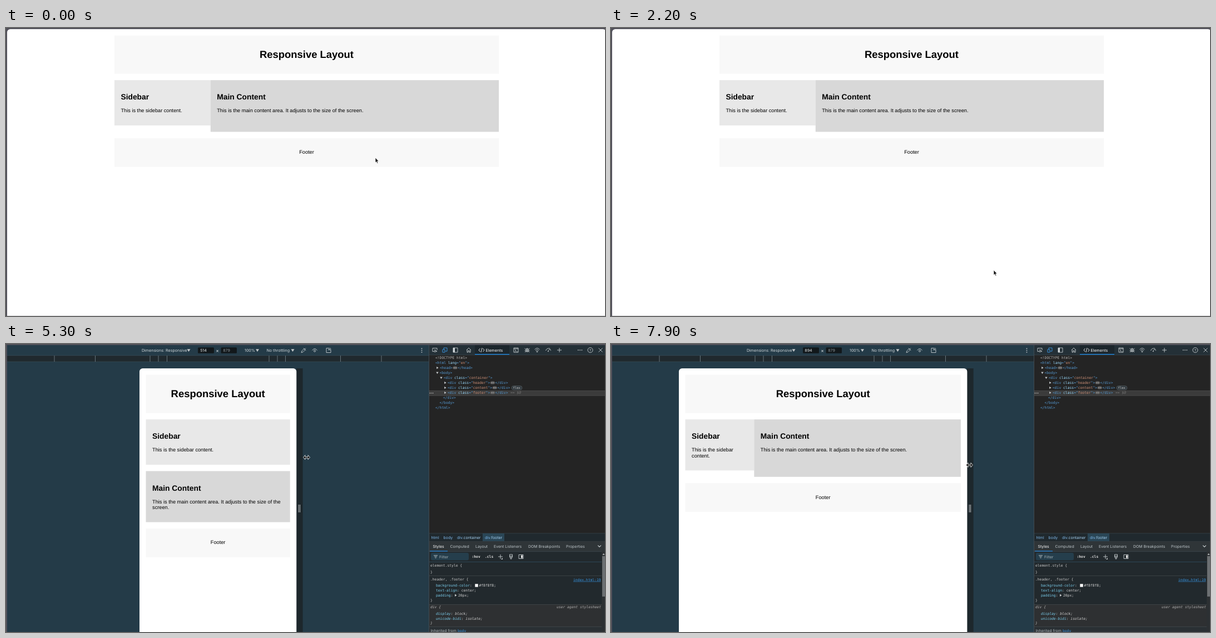
An HTML page for the animation above (8000 ms loop, 1077 by 520 pixels).

```html
<!DOCTYPE html>
<html lang="en">
<head>
<meta charset="utf-8">
<style>
html, body { margin: 0; width: 100%; height: 100%; overflow: hidden; background: #52515a; }
svg { position: absolute; left: 0; top: 0; }
text { white-space: pre; text-rendering: geometricPrecision; }
.ui { font-family: Inter, sans-serif; }
.mono { font-family: "DejaVu Sans Mono", monospace; font-size: 6.336px; }
#page {
  position: absolute; transform-origin: 0 0; transform: scale(.576); overflow: hidden;
  background: #fff; color: #000; font: 16px "Liberation Sans", Arial, sans-serif;
  border-radius: 10px 10px 0 0; text-rendering: geometricPrecision;
}
.container { max-width: 1200px; margin: 0 auto; padding: 20px; }
.container div { box-sizing: border-box; }
.header, .footer { background: #f8f8f8; text-align: center; padding: 20px; }
.header, .content, .sidebar { margin-bottom: 20px; }
.content { display: flex; }
.sidebar { width: 25%; background: #e8e8e8; padding: 20px; }
.main { width: 75%; background: #d8d8d8; padding: 20px; }
.narrow .content { display: block; }
.narrow .sidebar, .narrow .main { width: 100%; }
</style>
</head>
<body>
<svg id="back" width="1077" height="520"></svg>
<div id="page">
  <div class="container">
    <div class="header"><h1>Responsive Layout</h1></div>
    <div class="content">
      <div class="sidebar"><h2>Sidebar</h2><p>This is the sidebar content.</p></div>
      <div class="main"><h2>Main Content</h2><p>This is the main content area. It adjusts to the size of the screen.</p></div>
    </div>
    <div class="footer"><p>Footer</p></div>
  </div>
</div>
<svg id="front" width="1077" height="520"></svg>
<script>
const SCALE = 0.576, CENTER = 381, CHAR = 3.815;
const $ = id => document.getElementById(id);

// Drawing helpers; text is placed by its vertical centre.
const rect = (x, y, w, h, fill, extra = '') =>
  `<rect x="${x}" y="${y}" width="${w}" height="${h}" fill="${fill}" ${extra}/>`;
const ui = (x, y, str, fill = '#d5dbde', size = 6.95, extra = '') =>
  `<text class="ui" x="${x}" y="${y + size * 0.36}" font-size="${size}" fill="${fill}" ${extra}>${str}</text>`;
const mono = (x, y, str, fill = '#c8c8c8', extra = '') =>
  `<text class="mono" x="${x}" y="${y + 2.2}" fill="${fill}" ${extra}>${str}</text>`;
const icon = (x, y, d, color = '#d0d6d9', width = 0.85) =>
  `<path transform="translate(${x} ${y})" d="${d}" fill="none" stroke="${color}" stroke-width="${width}"/>`;
const solid = (x, y, d, color = '#c4c8ca') => `<path transform="translate(${x} ${y})" d="${d}" fill="${color}"/>`;
const span = (color, str) => `<tspan fill="${color}">${str}</tspan>`;
const group = (id, body) => `<g id="${id}">${body}</g>`;
const DOWN = 'M-3-2.2H3L0 2.6Z', RIGHT = 'M-1.5-2.2V2.2L2 0Z', OPEN = 'M-2.2-1.5H2.2L0 2Z';
const DOTS = 'M-4-.7h1.5v1.5h-1.5zM-.7-.7h1.5v1.5h-1.5zM2.6-.7h1.5v1.5h-1.5z';
const MONITOR = 'M-1 2.5H-4V-3.5H4V0M0-1V4L1.4 2.6H4Z';

// Context menu
const MENU = [
  [246.5, 'Back', 'Alt+Left arrow', 'M4 0H-4M-.5-3.5L-4 0L-.5 3.5'],
  [266, 'Refresh', 'Ctrl+R', 'M3.8-1.5A4 4 0 1 0 4 0M4-4V-1.3H1.3'],
  [290, 'Save as', 'Ctrl+S', 'M0 4H-4V-4H2.5L4-2.5V-1M-2-4V-1.5H1.5V-4M-2 4V1H1M0 4L4 0'],
  [309, 'Print', 'Ctrl+P', 'M-2.4 2H-4V-2H4V2H2.4M-2.4-2V-4H2.4V-2M-2.4.5H2.4V4H-2.4Z'],
  [328, 'Translate to English', '', 'M-4-1H-1V3H-3A1 1 0 0 1-3 1H-1M1-4V3H3A1.5 1.5 0 0 0 3-1H1M2-3H4'],
  [352, 'Add page to Collections', '', 'M-2-1.5H4V4H-2ZM1-.5V3M-.8 1.2H2.8M-3 2L-4-2.5L1.5-4L2-2'],
  [376.5, 'Share', '', 'M-1-3H-4V4H3V1.5M-2 1Q-1-2 2-2M1-4L4-1.8L1 .3'],
  [400.5, 'Screenshot', 'Ctrl+Shift+S', 'M-4-1V-3.5H-2M0-3.5H2M4-1V-3.5M-4 1V3.5H-2M4 1V3.5M-2-1.5L2 3.5M2-1.5L-2 3.5'],
  [424.5, 'View page source', 'Ctrl+U', ''],
  [443.5, 'Inspect', '', MONITOR],
];
const menu = rect(664, 235, 193, 221, '#4a4a4a', 'rx="3" stroke="#5c5c5c" stroke-width=".7" style="filter:drop-shadow(0 2px 3px #0007)"')
  + rect(664.4, 0, 192.2, 19, '#656565', 'id="hover"')
  + [278, 340, 364, 388, 412].map(y => rect(664.5, y, 192, 0.7, '#676767')).join('')
  + MENU.map(([y, label, keys, d], i) => {
      const color = i ? '#f2f2f2' : '#858585';
      return icon(677, y, d, color) + ui(688, y, label, color, 7.47)
        + ui(836, y, keys, i ? '#a8a8a8' : '#858585', 7.47, `text-anchor="end" id="keys${i}"`);
    }).join('') + solid(847, 352, RIGHT, '#c8c8c8');

// Device toolbar and ruler
const device = rect(2, 2, 758, 518, '#243b48') + rect(2, 21, 758, 11, '#20292e')
  + rect(2, 20.5, 758, 0.6, '#3c4f5a') + rect(2, 31.7, 758, 0.6, '#3c4f5a')
  + [87, 160.5, 259, 274, 289.5, 473, 488, 502.5, 601.5, 675].map(x => rect(x - 0.5, 21, 1, 11, '#66747b')).join('')
  + ui(244, 11.5, 'Dimensions: Responsive', '#d0d7da', 7.1) + solid(328.5, 11.5, DOWN)
  + rect(345, 6.3, 29, 10.4, '#12181b', 'rx="1.5"') + rect(386.5, 6.3, 28.5, 10.4, '#12181b', 'rx="1.5"')
  + ui(355, 11.5, '', '#e4e8ea', 7.1, 'id="width" text-anchor="middle"')
  + ui(380, 11.5, '×', '#e4e8ea', 8.5, 'text-anchor="middle"')
  + ui(396.5, 11.5, '879', '#8c9499', 7.1, 'text-anchor="middle"')
  + ui(429, 11.5, '100%', '#d0d7da', 7.1) + solid(452, 11.5, DOWN)
  + ui(468.5, 11.5, 'No throttling', '#d0d7da', 7.1) + solid(515.5, 11.5, DOWN)
  + icon(535, 11.5, 'M-4 4L-3 1L1-3L3-1L-1 3ZM0-4L4 0M2-2L4-4')
  + icon(555, 11.5, 'M-4.5 0Q0-6 4.5 0M-1.6 1A1.6 1.6 0 1 0 1.6 1A1.6 1.6 0 1 0-1.6 1')
  + icon(580, 11.5, 'M-4 4V-4H1V-1M-4 4H4V-1H-1M2-4Q4-4 4-2')
  + solid(747.5, 11.5, 'M-.8-4h1.6v1.6h-1.6zM-.8-.8h1.6v1.6h-1.6zM-.8 2.4h1.6v1.6h-1.6z')
  + group('grip', rect(0, 44, 11.5, 476, '#1d272c', 'id="bar"') + rect(3.6, 290, 1, 14, '#c0c4c6') + rect(6, 290, 1, 14, '#c0c4c6'));

// Inspector overlay
const overlay = '<path d="M289 354H473V406H289ZM300.5 365.5V394.5H461.5V365.5Z" fill="#a9e0b1" fill-rule="evenodd"/>'
  + rect(300.5, 365.5, 161, 29, 'rgba(83,159,222,.66)')
  + '<path d="M291 333.5H369.5Q371.5 333.5 371.5 335.5V348Q371.5 350 369.5 350H306L300 354.5L294 350H291Q289 350 289 348V335.5Q289 333.5 291 333.5Z" fill="#fff" style="filter:drop-shadow(0 0 1.5px #0006)"/>'
  + ui(294, 342, span('#881280', 'div') + '.footer', '#1a1aa6', 6.95, 'font-weight="700"')
  + ui(336, 342, '320 × 90', '#333');

// Developer panel
const TAG = '#569cd6', NAME = '#9cdcfe', VALUE = '#ce9178', LINK = '#3794e0', ACCENT = '#1f8ff0';
const rowY = n => 24.9 + n * 9;
const close = name => `&lt;/${name}&gt;`;
const openTag = (name, attr, value) => `&lt;${name}`
  + (attr ? ` ${span(NAME, attr)}="${span(VALUE, value)}"` : '') + '&gt;';
const tree = (x, n, str) => mono(x, rowY(n), str, TAG);
function folded(x, n, name, cls) {
  const length = name.length + 2 + (cls ? cls.length + 9 : 0), end = x + length * CHAR, y = rowY(n);
  return solid(x - 4.3, y, RIGHT) + tree(x, n, openTag(name, cls && 'class', cls))
    + rect(end + 0.6, y - 2.7, 8, 5.4, '#5a5a5a', 'rx="2.7"')
    + `<g transform="translate(${end + 4.6} ${y}) scale(.65)">${solid(0, 0, DOTS, '#ddd')}</g>`
    + tree(end + 9.3, n, close(name));
}
const docTop = mono(772, rowY(0), '&lt;!DOCTYPE html&gt;', '#b8b8b8') + tree(772, 1, openTag('html', 'lang', 'en')) + folded(780, 2, 'head');
const foldedDoc = docTop + folded(780, 3, 'body') + tree(772, 4, close('html'));
const fullDoc = rect(761, 84.3, 316, 9, '#3b3b3b') + rect(761, 84, 316, 0.6, '#555') + rect(761, 92.8, 316, 0.6, '#555')
  + docTop + solid(775.5, rowY(3), OPEN) + tree(779.5, 3, openTag('body'))
  + solid(782.5, rowY(4), OPEN) + tree(787, 4, openTag('div', 'class', 'container'))
  + ['header', 'content', 'footer'].map((cls, i) => folded(794, 5 + i, 'div', cls)).join('')
  + rect(909, 75.6, 19, 7.2, '#30383d', 'rx="3.6" stroke="#60686c" stroke-width=".6"') + mono(911.4, 79, 'flex', '#d0d0d0', 'style="font-size:5.6px"')
  + `<g transform="translate(765 88.6) scale(.8)">${solid(0, 0, DOTS, '#ddd')}</g>`
  + mono(907, rowY(7), '== $0', '#777', 'font-style="italic"')
  + tree(786, 8, close('div')) + tree(779.5, 9, close('body')) + tree(772, 10, close('html'))
  + rect(761, 342, 316, 14, '#20292e') + rect(761, 341.6, 316, 0.6, '#3a4a53') + rect(857, 342, 39, 14, '#2a4656')
  + ui(764.5, 349, 'html', '#7fb8ea') + ui(786.5, 349, 'body', '#7fb8ea')
  + ui(811, 349, span('#7fb8ea', 'div') + '.container', '#a8d4f5') + ui(861, 349, span('#7fb8ea', 'div') + '.footer', '#a8d4f5');

const prop = (y, name, value, extra) => mono(773, y, `${span('#7cd0ef', name)}: ${value}`, '#d4d4d4', extra);
const right = 'text-anchor="end" ', italic = 'font-style="italic" ', underline = 'text-decoration="underline" ';
const styles = rect(761, 470, 310, 40, '#2e3032')
  + rect(761, 510, 310, 10, '#2a3034')
  + [418, 470, 510].map(y => rect(761, y, 310, 0.6, '#4a5053')).join('')
  + mono(763, 399.5, 'element.style {') + mono(763, 411.5, '}')
  + mono(763, 424.5, '.header, .footer {') + mono(1069.5, 425.5, 'index.html:19', LINK, right + underline)
  + prop(436, 'background-color', '') + rect(843.3, 433.2, 5.5, 5.5, '#f8f8f8') + mono(850.5, 436, '#f8f8f8;', '#d4d4d4')
  + prop(445, 'text-align', 'center;') + prop(453.7, 'padding', '') + solid(808.5, 453.7, RIGHT) + mono(813, 453.7, '20px;', '#d4d4d4')
  + mono(763, 462.5, '}')
  + mono(763, 475.2, 'div {', '#b8b8b8', italic) + mono(1070, 475.2, 'user agent stylesheet', '#b0b0b0', italic + right)
  + prop(487, 'display', 'block;', italic) + prop(495.6, 'unicode-bidi', 'isolate;', italic) + mono(763, 504, '}', '#b8b8b8', italic)
  + ui(763.5, 517.3, 'Inherited from', '#a8b0b4') + mono(812, 517.6, 'body', LINK, underline)
  + rect(1072, 383, 5, 73, '#6c7073')
  + icon(908, 384, 'M-2.5-4H2.5V1H-2.5ZM-2.5-1H2.5M-1 1V4H1V1') + icon(926, 384, 'M-4-3.5H4V3.5H-4Z') + rect(926, 381.5, 3, 5, '#e0e0e0');

const panelTools = rect(761, 2, 316, 18, '#243037') + rect(843, 2, 62, 18, '#1c262c') + rect(843, 18, 62, 1.4, ACCENT)
  + rect(761, 19.6, 316, 0.6, '#3d4a52')
  + icon(771, 11, MONITOR) + icon(789, 11, 'M-2-1V-4H4V2H1M-4-1H0V4H-4Z', '#3f9ff0')
  + icon(808, 11, 'M-4-4H4V4H-4Z') + rect(804, 7, 3, 8, '#d0d6d9')
  + icon(832, 11, 'M-4 0L0-4L4 0M-3-1V4H-1V1H1V4H3V-1')
  + icon(855, 11, 'M-2.5-3L-5 0L-2.5 3M2.5-3L5 0L2.5 3M1-4L-1 4', '#fff') + ui(862.5, 11, 'Elements', '#fff', 7.1)
  + icon(917, 11, 'M-4-4H4V4H-4ZM-4-2.3H4M-2-1L0 1L-2 2.8M.5 2.8H2.5')
  + icon(937, 11, 'M-2-2H2V2Q0 5-2 2ZM-1.5-2Q0-5 1.5-2M-4.5-3L-2-1M4.5-3L2-1M-4.5 1H4.5M-4 4L-2 2M4 4L2 2M0-2V3')
  + icon(955, 11, 'M-4.5-1Q0-6 4.5-1M-3 1Q0-2.5 3 1M-1.3 2.5Q0 1 1.3 2.5L0 4Z')
  + icon(975, 11, 'M-4.5 1Q-3-4 3-3M4.5 1Q4-1 3-2M-1 2L3-2M-1 2Q0 4 1 2')
  + icon(995, 11, 'M-4 0H4M0-4V4') + solid(1032, 11, DOTS)
  + '<circle cx="1050.5" cy="11" r="4.5" fill="none" stroke="#d0d6d9" stroke-width=".85"/>'
  + ui(1050.5, 11.2, '?', '#d0d6d9', 6.8, 'text-anchor="middle"') + icon(1069, 11, 'M-3.5-3.5L3.5 3.5M3.5-3.5L-3.5 3.5');
const panelStyles = rect(761, 346, 316, 10, '#20292e') + rect(761, 346, 316, 0.7, '#2b5068')
  + rect(761, 356, 316, 19, '#2f3538') + rect(761, 355.6, 316, 0.6, '#3d4a52') + rect(761, 375, 316, 145, '#22292d')
  + rect(762, 373.4, 32, 1.4, ACCENT) + rect(761, 374.6, 310, 0.5, '#45525a')
  + [[767.5, 'Styles'], [798.5, 'Computed'], [844, 'Layout'], [877, 'Event Listeners'], [939, 'DOM Breakpoints'], [1007, 'Properties']]
      .map(([x, label], i) => ui(x, 365, label, i ? '#bcc4c8' : '#fff')).join('')
  + icon(1067, 365, 'M-2.8-1.4L0 1.4L2.8-1.4', '#d0d6d9', 1.1)
  + rect(764, 377, 68, 13.6, '#253e4c', 'rx="3"') + icon(772.5, 384, 'M-3.5-2.2H3.5M-2.2 0H2.2M-1 2.2H1') + ui(779, 384, 'Filter', '#a4b0b6')
  + mono(837.5, 384, ':hov', '#e0e0e0', 'font-weight="700"') + mono(861, 384, '.cls', '#e0e0e0', 'font-weight="700"')
  + icon(889, 384, 'M-4 0H4M0-4V4') + solid(893, 388, 'M0-2V1H-3Z')
  + rect(761, 393, 310, 0.8, '#2f4f61') + rect(1071, 375, 6, 145, '#2c3033') + solid(1074.5, 379.5, 'M-2 1.2H2L0-1.5Z');

$('back').innerHTML = group('device', device);
$('front').innerHTML = group('overlay', overlay)
  + group('panel', rect(760, 2, 317, 518, '#242424') + rect(760, 2, 0.9, 518, '#46525a'))
  + group('tools', panelTools + panelStyles)
  + group('foldedDoc', foldedDoc) + group('fullDoc', fullDoc) + group('styles', styles)
  + group('menu', menu)
  + '<path id="cursor" fill="#111" stroke="#fff" stroke-width=".8"/>';

const ARROW = 'M0 0V9.2L2 7.4L3.5 10.6L5 9.9L3.6 6.8H6.3Z';
const RESIZE = 'M-6 0L-2.6-4V-1.2H2.6V-4L6 0L2.6 4V1.2H-2.6V4Z';

// Keyframes are [time, value]; each stretch eases in and out.
function track(keys, t) {
  const i = keys.findIndex(k => k[0] > t);
  if (i < 0) return keys[keys.length - 1][1];
  if (i === 0) return keys[0][1];
  const [t0, a] = keys[i - 1], [t1, b] = keys[i], u = (t - t0) / (t1 - t0);
  return a + (b - a) * u * u * (3 - 2 * u);
}
const WIDTH = [[4900, 360], [5000, 374], [5100, 374], [5780, 1044], [5850, 1044], [6000, 1056], [6300, 1056],
  [7050, 1226], [7200, 1226], [7700, 950], [7800, 950], [7900, 894]];
const CURSOR_X = [[900, 664], [1500, 690], [1900, 688], [3600, 688], [4500, 495.5], [4600, 494]];
const CURSOR_Y = [[900, 234], [1500, 417], [1800, 436], [1900, 437], [3600, 437], [4500, 198], [4900, 198], [5800, 214], [6900, 216], [7900, 218.5]];

const show = (id, on) => $(id).style.display = on ? '' : 'none';

function draw(t) {
  const docked = t >= 2600, dragging = t >= 5000;
  const width = track(WIDTH, t), shown = track(WIDTH, t - 20);
  const edge = CENTER + shown * SCALE / 2;

  show('device', docked);
  show('panel', docked);
  show('tools', t >= 2900);
  show('foldedDoc', t >= 2900 && t < 3300);
  show('fullDoc', t >= 3300);
  show('styles', t >= 3400);
  show('overlay', t >= 2900 && !dragging);

  const page = $('page'), top = docked ? 43.5 : 2, pageWidth = docked ? shown : 1077 / SCALE;
  page.style.left = (docked ? CENTER - shown * SCALE / 2 : 2) + 'px';
  page.style.top = top + 'px';
  page.style.width = pageWidth + 'px';
  page.style.height = (520 - top) / SCALE + 'px';
  page.className = pageWidth <= 768 ? 'narrow' : '';
  $('width').textContent = Math.round(width);
  $('grip').setAttribute('transform', `translate(${edge} 0)`);

  const x = dragging ? CENTER + width * SCALE / 2 + (t > 7200 ? 6 : 11.5) : track(CURSOR_X, t);
  const y = track(CURSOR_Y, t);
  const resizing = docked && x < 497 || dragging;
  $('bar').setAttribute('fill', resizing && !dragging ? '#2d3539' : '#1d272c');
  $('cursor').setAttribute('d', resizing ? RESIZE : ARROW);
  $('cursor').setAttribute('transform', `translate(${x} ${y})`);

  show('menu', t >= 600 && t < 2200);
  $('menu').style.opacity = Math.min(1, (t - 500) / 300);
  const over = MENU.findIndex((item, i) => i && Math.abs(item[0] - y) <= 9.5);
  show('hover', over > 0);
  if (over > 0) $('hover').setAttribute('y', MENU[over][0] - 9.5);
  MENU.forEach((_, i) => i && $('keys' + i).setAttribute('fill', i === over ? '#f2f2f2' : '#a8a8a8'));
}

function tick() {
  draw(Math.floor(performance.now() % 8000 / 100) * 100);
  requestAnimationFrame(tick);
}
tick();
</script>
</body>
</html>
```
